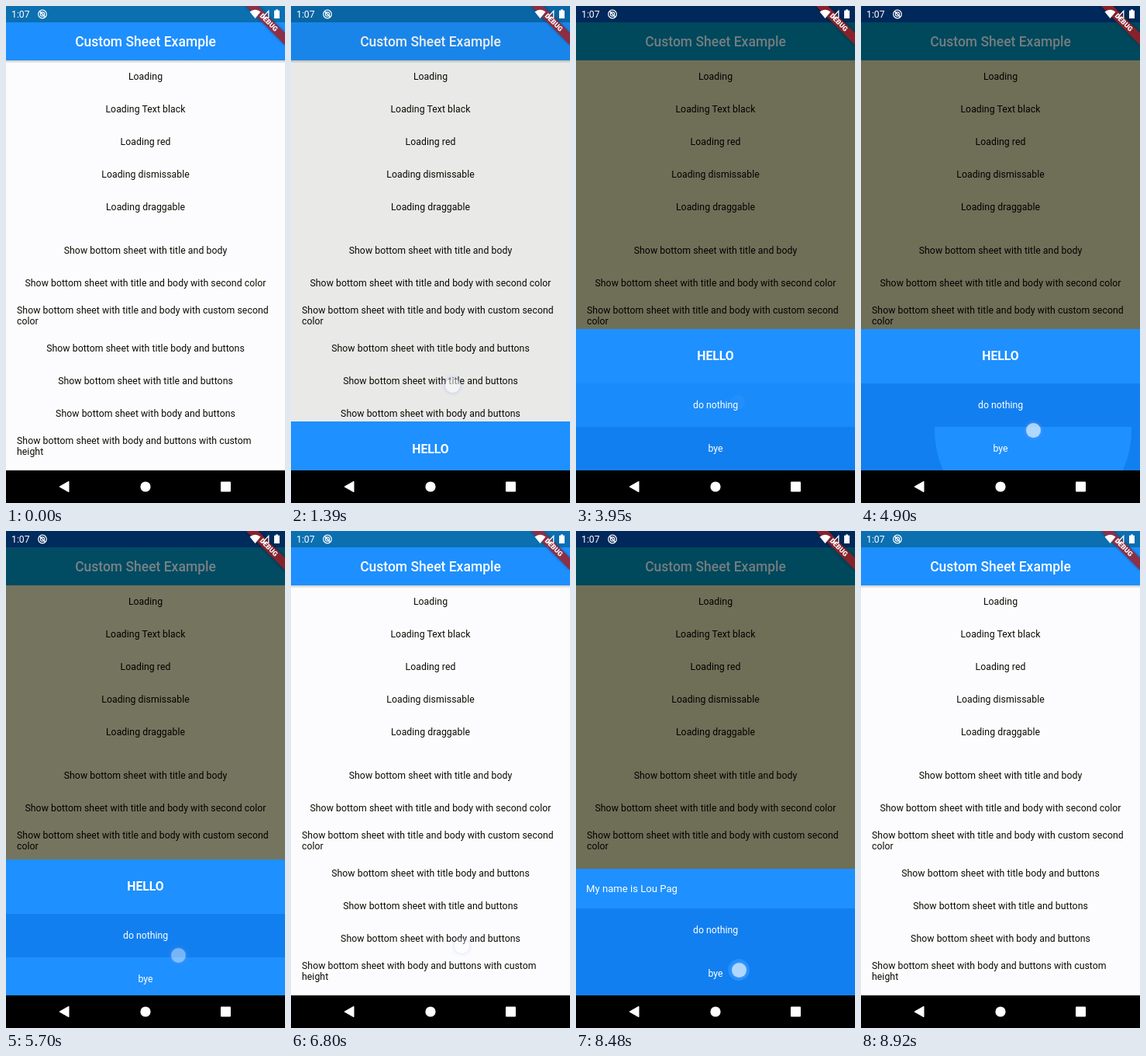
These frames come from a looping animation (360x640 px, 8990 ms). An HTML page:

```html
<!DOCTYPE html>
<html lang="en">
<head>
<meta charset="utf-8">
<title>Custom Sheet Example</title>
<style>
html, body { margin: 0; width: 100%; height: 100%; overflow: hidden; background: #000; }
#stage {
  position: absolute; left: 0; top: 0; width: 360px; height: 640px; overflow: hidden;
  background: #fff; color: #fff; font: 400 12.25px/14px Roboto, sans-serif;
}
#stage div, #stage svg { position: absolute; }
.page { left: 0; top: 0; width: 360px; height: 598px; overflow: hidden; background: #fcfcfe; }
.status { left: 0; top: 0; width: 360px; height: 21px; background: #0b6fb0; }
.bar {
  left: 0; top: 21px; width: 360px; height: 49px; background: #1e8fff;
  font-size: 17.5px; font-weight: 500; line-height: 50px; text-align: center;
}
.shade { left: 0; top: 70px; width: 360px; height: 3px; background: linear-gradient(#cfcfcc, #ececea); }
.item {
  left: 14px; width: 332px; color: #0c0c02; letter-spacing: .06px;
  text-align: center; white-space: pre; transform: translateY(-50%);
}
.item.wrap { text-align: left; }
.foot { left: 0; top: 594px; width: 360px; height: 4px; background: #fff; }
.ribbon {
  left: 304px; top: 15.75px; width: 70px; height: 10.5px; transform: rotate(45deg);
  background: #8c3048; box-shadow: 0 0 4px rgba(0, 0, 0, .4);
  font-size: 8.9px; font-weight: 900; line-height: 10.5px; text-align: center;
}
.dim { background: #6f6f58; }
.dim .status { background: #00285a; }
.dim .bar { background: #00485c; color: #737d80; }
.dim .shade, .dim .foot { display: none; }
.dim .item { color: #000; }
.dim .ribbon { background: #86222c; }
#sheet { left: 0; width: 360px; background: #1e90ff; }
#head { left: 0; top: 0; width: 360px; }
#head.title { padding-top: .5px; font-size: 15.75px; font-weight: 700; text-align: center; }
#head.body { font-size: 13.125px; text-indent: 13px; }
.row {
  left: 0; width: 360px; height: 56px; overflow: hidden; background: #127ff0;
  line-height: 56px; text-align: center;
}
.row span { position: relative; }
.ripple { border-radius: 50%; background: #1e90ff; }
#touch {
  width: 19px; height: 19px; margin: -9.5px 0 0 -9.5px; border-radius: 50%;
  background: rgba(255, 255, 255, .65);
  box-shadow: 0 0 4px 1px rgba(130, 160, 245, .5);
}
#clock { left: 7px; top: 4px; }
</style>
</head>
<body>
<div id="stage">
  <div class="page" id="page">
    <div class="status"></div>
    <div class="bar">Custom Sheet Example</div>
    <div class="shade"></div>
    <div class="foot"></div>
    <div class="ribbon">DEBUG</div>
  </div>
  <div id="sheet">
    <div id="head"></div>
    <div class="row"><div class="ripple"></div><span>do nothing</span></div>
    <div class="row"><div class="ripple"></div><span>bye</span></div>
  </div>
  <div id="clock">1:07</div>
  <svg width="360" height="640" fill="#fff">
    <g fill="none" stroke="#fff">
      <circle cx="47" cy="10.5" r="5.3" stroke-width="1.2"/>
      <circle cx="47" cy="10.5" r="2.6" stroke-width="1.2"/>
      <path d="M43.5 7 50.5 14" stroke-width="1.4"/>
      <path d="M330.8 15.2H338.8V6.4Z" stroke-width="1.3"/>
    </g>
    <path d="M314.5 7.4Q321.5 2.3 328.5 7.4L321.5 16Z"/>
    <path d="M348 4.5h3v1.3h2v10.2h-7V5.8h2Z"/>
    <path d="M0 598H360V640H0Z" fill="#000"/>
    <path d="M69 619 81 612.2V625.8Z" stroke="#fff" stroke-linejoin="round"/>
    <circle cx="180" cy="619" r="6.6"/>
    <rect x="277" y="612.5" width="13" height="13" rx="1"/>
  </svg>
  <div id="touch"></div>
</div>
<script>
const LOOP = 8990, TICK = LOOP / 123, BOTTOM = 598;
const $ = s => document.querySelector(s);
const sheet = $('#sheet'), head = $('#head'), touch = $('#touch');
const rows = [...document.querySelectorAll('.row')];
const ripples = rows.map(r => r.firstChild);

const show = 'Show bottom sheet with ';
const items = [
  [91, 'Loading'], [133, 'Loading Text black'], [175, 'Loading red'],
  [217, 'Loading dismissable'], [259, 'Loading draggable'],
  [315, show + 'title and body'],
  [357, show + 'title and body with second color'],
  [399, show + 'title and body with custom second\ncolor'],
  [441, show + 'title body and buttons'],
  [483, show + 'title and buttons'],
  [525, show + 'body and buttons'],
  [567, show + 'body and buttons with custom\nheight']
];
for (const [y, text] of items) {
  const el = document.createElement('div');
  el.className = text.includes('\n') ? 'item wrap' : 'item';
  el.style.top = y + 'px';
  el.textContent = text;
  $('#page').append(el);
}
const dim = $('#page').cloneNode(true);
dim.id = 'dim';
dim.classList.add('dim');
$('#page').after(dim);

// All times below are counted in ticks.
const sheets = [
  { open: 18.6, close: 77.28, end: 80, kind: 'title', text: 'HELLO', head: 70.5 },
  { open: 95.6, close: 119.28, end: 122, kind: 'body', text: 'My name is Lou Pag', head: 51 }
];
const touches = [
  { x: 208, y: 488, fade: [[16, .5], [17, 1], [18, 1], [22, 0]] },
  { x: 208, y: 510, fade: [[30, 1], [49, 1], [54, .05], [55, 0]] },
  { x: 222, y: 546, fade: [[57, 1], [76, 1], [78, .65], [80, 0]] },
  { x: 220, y: 534, fade: [[93, .5], [94, 1], [95, 1], [99, 0]] },
  { x: 210, y: 565, fade: [[116, 1], [118, 1], [120, .65], [122, 0]] }
];
const splashes = [
  { row: 0, x: 208, y: 24, size: [[30, 12], [32, 12], [48, 211], [55, 211]], fade: [[52, 1], [53, .9], [54, .7], [55, 0]] },
  { row: 1, x: 222, y: 4, size: [[57, 12], [59, 12], [74, 228], [80, 228]], fade: [[80, 1]] },
  { row: 1, x: 210, y: 23, size: [[116, 14], [117, 22], [118, 40], [121, 220], [122, 220]], fade: [[122, 1]] }
];

const clamp = v => Math.min(1, Math.max(0, v));

function track(k, points) {
  if (k <= points[0][0]) return points[0][1];
  for (let i = 1; i < points.length; i++) {
    const [a, u] = points[i - 1], [b, v] = points[i];
    if (k <= b) return u + (v - u) * (k - a) / (b - a);
  }
  return points.at(-1)[1];
}

function bezier(x1, y1, x2, y2) {
  const at = (a, b, t) => 3 * a * t * (1 - t) ** 2 + 3 * b * t * t * (1 - t) + t ** 3;
  return x => {
    let lo = 0, hi = 1;
    for (let i = 0; i < 24; i++) {
      const mid = (lo + hi) / 2;
      if (at(x1, x2, mid) < x) lo = mid; else hi = mid;
    }
    return at(y1, y2, (lo + hi) / 2);
  };
}
const slide = bezier(0, 0, .2, 1), ease = bezier(.25, .1, .25, 1);

const active = (k, points) => k >= points[0][0] && k < points.at(-1)[0];

function drawSheet(k) {
  const s = sheets.find(s => k >= s.open && k < s.end);
  sheet.style.display = dim.style.display = s ? '' : 'none';
  if (!s) return;
  const enter = clamp((k - s.open) * TICK / 248);
  const value = k < s.close ? enter : 1 - clamp((k - s.close) * TICK / 200);
  const height = s.head + 112;
  dim.style.opacity = ease(value);
  sheet.style.height = height + 'px';
  sheet.style.top = BOTTOM - height * slide(value) + 'px';
  head.className = s.kind;
  head.textContent = s.text;
  head.style.lineHeight = s.head + 'px';
  rows.forEach((r, i) => r.style.top = s.head + 56 * i + 'px');
}

function drawRipples(k) {
  ripples.forEach((el, row) => {
    const s = splashes.find(s => s.row === row && active(k, s.size));
    el.style.display = s ? '' : 'none';
    if (!s) return;
    const r = track(k, s.size);
    el.style.left = s.x - r + 'px';
    el.style.top = s.y - r + 'px';
    el.style.width = el.style.height = 2 * r + 'px';
    el.style.opacity = track(k, s.fade);
  });
}

function drawTouch(k) {
  const p = touches.find(p => active(k, p.fade));
  touch.style.opacity = p ? track(k, p.fade) : 0;
  if (!p) return;
  touch.style.left = p.x + 'px';
  touch.style.top = p.y + 'px';
}

const start = performance.now();
function frame() {
  const t = (performance.now() - start) % LOOP;
  const k = Math.floor((t + 4) / TICK) % 123;
  drawSheet(k);
  drawRipples(k);
  drawTouch(k);
  requestAnimationFrame(frame);
}
frame();
</script>
</body>
</html>
```
